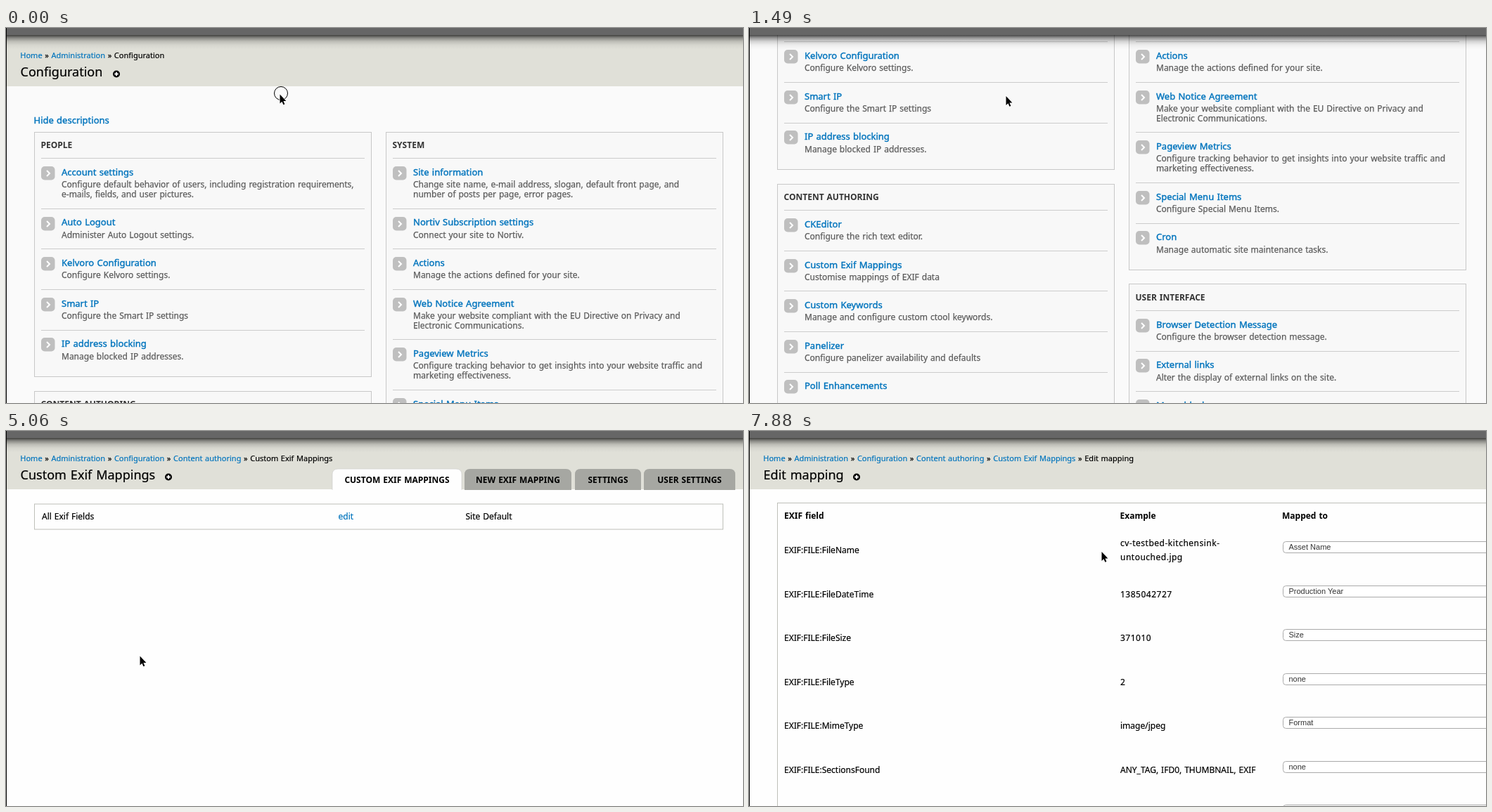
An HTML page that plays this animation: 1048 by 534 pixels, repeating every 8 s.

```html
<!DOCTYPE html>
<html lang="en">
<head>
<meta charset="utf-8">
<title>Admin configuration walkthrough</title>
<style>
  html, body { margin: 0; width: 100%; height: 100%; overflow: hidden; background: #fefefe; }
  svg { display: block; width: 100vw; height: 100vh; }
  text { font: 12px "Noto Sans", "Open Sans", sans-serif; word-spacing: .07em; white-space: pre;
         fill: #000; stroke: #000; stroke-width: .2px; }
  .bold, .tab { font-weight: 700; stroke: none; }
  .title { font-weight: 700; fill: #333; stroke: none; }
  .desc { fill: #5c5c5c; stroke: #5c5c5c; stroke-width: .25px; }
  .link { fill: #0074bd; stroke: #0074bd; }
  .big { font-size: 13px; stroke-width: .4px; }
  .crumb { font-size: 11px; }
  .heading { font-size: 18px; }
  .spaced { letter-spacing: .5px; }
  .tab { text-anchor: middle; }
  .select { font: 11px "Liberation Sans", Arial, sans-serif; fill: #333; stroke: none; word-spacing: 0; }
  .hover .target { text-decoration: underline; }
  .box { fill: none; stroke: #bebfb9; }
</style>
</head>
<body>
<svg id="stage" viewBox="0 0 1048 534">
  <defs>
    <linearGradient id="shade" x2="0" y2="1">
      <stop offset="0" stop-opacity=".72"/>
      <stop offset=".2" stop-opacity=".4"/>
      <stop offset=".45" stop-opacity=".16"/>
      <stop offset=".7" stop-opacity=".05"/>
      <stop offset="1" stop-opacity="0"/>
    </linearGradient>
  </defs>
  <g id="pages"></g>
  <g id="bar">
    <rect width="1048" height="10" fill="#666"/>
    <rect y="10" width="1048" height="20" fill="url(#shade)"/>
  </g>
  <rect width="1" height="534"/>
  <circle id="click" r="9.5" fill="none" stroke="#000"/>
  <path id="arrow" d="M.5 1V14L3.4 11.3 5.4 15.8 7.4 15 5.4 10.5H9.4Z"
        stroke="#fff" stroke-width="1.6" paint-order="stroke"/>
  <g id="hand" fill="#fff" stroke="#000" stroke-width="1.2" stroke-linejoin="round">
    <path d="M.2 9.5L-1 3Q-1.2.5.4.5 1.8.5 2.2 2.4L3 5.6Q3.8 4.2 5.2 5 6.4 4.6 7 5.8 8.8 5.4 9.2 6.8 10.6 8 9.6 11.5L8.8 15.6H2Q0 12.5-2.8 9.6-3.8 8-2.4 7.6-1 7.6.2 9.5Z"/>
    <path d="M3.4 9v4M5.4 9v4M7.4 9v4" stroke-width=".8"/>
  </g>
</svg>
<script>
const $ = id => document.getElementById(id);

const text = (x, y, cls, str) => `<text x="${x}" y="${Math.round(y)}" class="${cls}">${str}</text>`;
const rect = (x, y, w, h, attrs) => `<rect x="${x}" y="${y}" width="${w}" height="${h}" ${attrs}/>`;

function header(trail, heading, plusX) {
  const last = trail.length - 1;
  const crumbs = trail.map((name, i) => i < last ? `<tspan class="link">${name}</tspan> » ` : name).join("");
  return rect(0, 0, 1048, 83, 'fill="#e0e0d8"') +
    text(20.3, 43, "crumb", crumbs) + text(20.6, 69, "heading", heading) +
    `<circle cx="${plusX}" cy="65.5" r="5"/><path d="M${plusX - 2.7} 65.5h5.4m-2.7-2.7v5.4" stroke="#fff" stroke-width="2"/>`;
}

// Each item is [link, description line, ...]
function panel(x, top, title, items) {
  let y = top + 37.7, body = "";
  for (const [link, ...lines] of items) {
    const iconY = Math.round(y + 11.3);
    const target = link === "Custom Exif Mappings" ? " target" : "";
    body += rect(x + 10, Math.floor(y), 460, 1, 'fill="#ccc"') +
      rect(x + 10, iconY, 19.5, 19.5, 'rx="5" fill="#bfbfbf"') +
      `<path d="M${x + 18} ${iconY + 6}l4 4-4 4" fill="none" stroke="#fff" stroke-width="2"/>` +
      text(x + 39, y + 24.2, "link big" + target, link) +
      lines.map((line, i) => text(x + 39, y + 41.5 + 14 * i, "desc", line)).join("");
    y += 57.6 + 13.9 * Math.max(0, lines.length - 1);
  }
  return rect(x + .5, Math.floor(top) + .5, 479, Math.round(y + 8.3 - top), 'fill="#f8f8f8" stroke="#c8c8c8"') +
    text(x + 9.5, top + 23, "title", title) + body;
}

function tab(x, w, label, active) {
  const right = x + w;
  const style = active ? 'fill="#fefefe" stroke="#ccc" stroke-width=".6"' : 'fill="#a6a7a2"';
  return `<path d="M${x} 84V62q0-8 8-8H${right - 8}q8 0 8 8V84" ${style}/>` + text(x + w / 2, 74, "tab", label);
}

const trail = ["Home", "Administration", "Configuration", "Content authoring", "Custom Exif Mappings", "Edit mapping"];

const configPage = rect(0, 0, 1048, 1200, 'fill="#fafafa"') +
  header(trail.slice(0, 3), "Configuration", 157) +
  text(39.5, 136, "link big", "Hide descriptions") +
  panel(40, 148, "PEOPLE", [
    ["Account settings", "Configure default behavior of users, including registration requirements,", "e-mails, fields, and user pictures."],
    ["Auto Logout", "Administer Auto Logout settings."],
    ["Kelvoro Configuration", "Configure Kelvoro settings."],
    ["Smart IP", "Configure the Smart IP settings"],
    ["IP address blocking", "Manage blocked IP addresses."]
  ]) +
  panel(40, 517, "CONTENT AUTHORING", [
    ["CKEditor", "Configure the rich text editor."],
    ["Custom Exif Mappings", "Customise mappings of EXIF data"],
    ["Custom Keywords", "Manage and configure custom ctool keywords."],
    ["Panelizer", "Configure panelizer availability and defaults"],
    ["Poll Enhancements"]
  ]) +
  panel(540, 148, "SYSTEM", [
    ["Site information", "Change site name, e-mail address, slogan, default front page, and", "number of posts per page, error pages."],
    ["Nortiv Subscription settings", "Connect your site to Nortiv."],
    ["Actions", "Manage the actions defined for your site."],
    ["Web Notice Agreement", "Make your website compliant with the EU Directive on Privacy and", "Electronic Communications."],
    ["Pageview Metrics", "Configure tracking behavior to get insights into your website traffic and", "marketing effectiveness."],
    ["Special Menu Items", "Configure Special Menu Items."],
    ["Cron", "Manage automatic site maintenance tasks."]
  ]) +
  panel(540, 659.7, "USER INTERFACE", [
    ["Browser Detection Message", "Configure the browser detection message."],
    ["External links", "Alter the display of external links on the site."],
    ["Menu block"]
  ]);

const mappingsPage = header(trail.slice(0, 5), "Custom Exif Mappings", 231) +
  tab(464, 184, "CUSTOM EXIF MAPPINGS", true) + tab(652, 152, "NEW EXIF MAPPING") +
  tab(809, 94, "SETTINGS") + tab(907, 130, "USER SETTINGS") +
  rect(40.5, 104, 979, 36, 'class="box"') +
  text(51, 126, "", "All Exif Fields") + text(472.5, 126, "link target", "edit") + text(653.5, 126, "", "Site Default");

const rows = [
  ["FileName", "", "Asset Name"],
  ["FileDateTime", "1385042727", "Production Year"],
  ["FileSize", "371010", "Size"],
  ["FileType", "2", "none"],
  ["MimeType", "image/jpeg", "Format"],
  ["SectionsFound", "ANY_TAG, IFD0, THUMBNAIL, EXIF", "none"],
  ["", "", ""]
];

const editPage = header(trail, "Edit mapping", 153) +
  rect(40.5, 102.5, 1100, 600, 'class="box"') +
  text(50, 125, "bold", "EXIF field") + text(527.5, 125, "bold", "Example") + text(758, 125, "bold", "Mapped to") +
  text(528, 164, "spaced", "cv-testbed-kitchensink-") + text(528, 184, "spaced", "untouched.jpg") +
  rows.map(([field, example, choice], i) => {
    const y = 174 + 62.5 * i;
    return text(50, y, "", "EXIF:FILE:" + field) +
      text(528, y, /^\d+$/.test(example) ? "spaced" : "", example) +
      rect(759.5, Math.round(y - 17) + .5, 320, 16, 'rx="4" fill="#fff" stroke="#aaa"') +
      text(767.5, y - 5, "select", choice);
  }).join("");

$("pages").innerHTML = [configPage, mappingsPage, editPage].map(page => `<g>${page}</g>`).join("");
const pages = [...$("pages").children];

// Timelines hold each value until the next time
const BLANK = -1;
const pageTimes = [[0, 0], [3870, BLANK], [4010, 1], [7130, BLANK], [7280, 2]];
const scrolls = [[0, 0], [600, 14], [740, 68], [890, 124], [1040, 184], [1190, 242], [1340, 282], [1490, 295]];
const ARROW = 0, HAND = 1;
const moves = [
  [0, ARROW, 389, 93.5], [1340, ARROW, 385, 94], [1490, ARROW, 365, 96], [1640, ARROW, 228, 156],
  [1780, ARROW, 214, 215], [1930, ARROW, 196, 290], [2080, HAND, 184, 337], [2230, HAND, 181, 343],
  [5060, ARROW, 190, 319.5], [5210, ARROW, 289, 213], [5360, ARROW, 446, 146], [5500, ARROW, 496, 107],
  [5650, ARROW, 495, 110], [5800, HAND, 489, 118], [5940, HAND, 486, 121], [7880, ARROW, 501, 171]
];
const clicks = [[0, 150, 391, 93], [2970, 3120, 183, 341], [6240, 6380, 488, 119]];

const at = (timeline, t) => timeline.findLast(([start]) => start <= t);
const show = (el, visible) => { el.style.display = visible ? "" : "none"; };
const place = (el, x, y) => el.setAttribute("transform", `translate(${x} ${y})`);

function draw() {
  const t = performance.now() % 8000;
  const page = at(pageTimes, t)[1];
  pages.forEach((el, i) => show(el, i === page));
  show($("bar"), page !== BLANK);
  place(pages[0], 0, -at(scrolls, t)[1]);
  $("stage").classList.toggle("hover", t >= 2080 && t < 3870 || t >= 5800);

  const [, shape, x, y] = at(moves, t);
  ["arrow", "hand"].forEach((id, i) => { show($(id), i === shape); place($(id), x, y); });

  const click = clicks.find(([start, end]) => t >= start && t < end);
  show($("click"), click);
  if (click) place($("click"), click[2], click[3]);
  requestAnimationFrame(draw);
}
draw();
</script>
</body>
</html>
```
